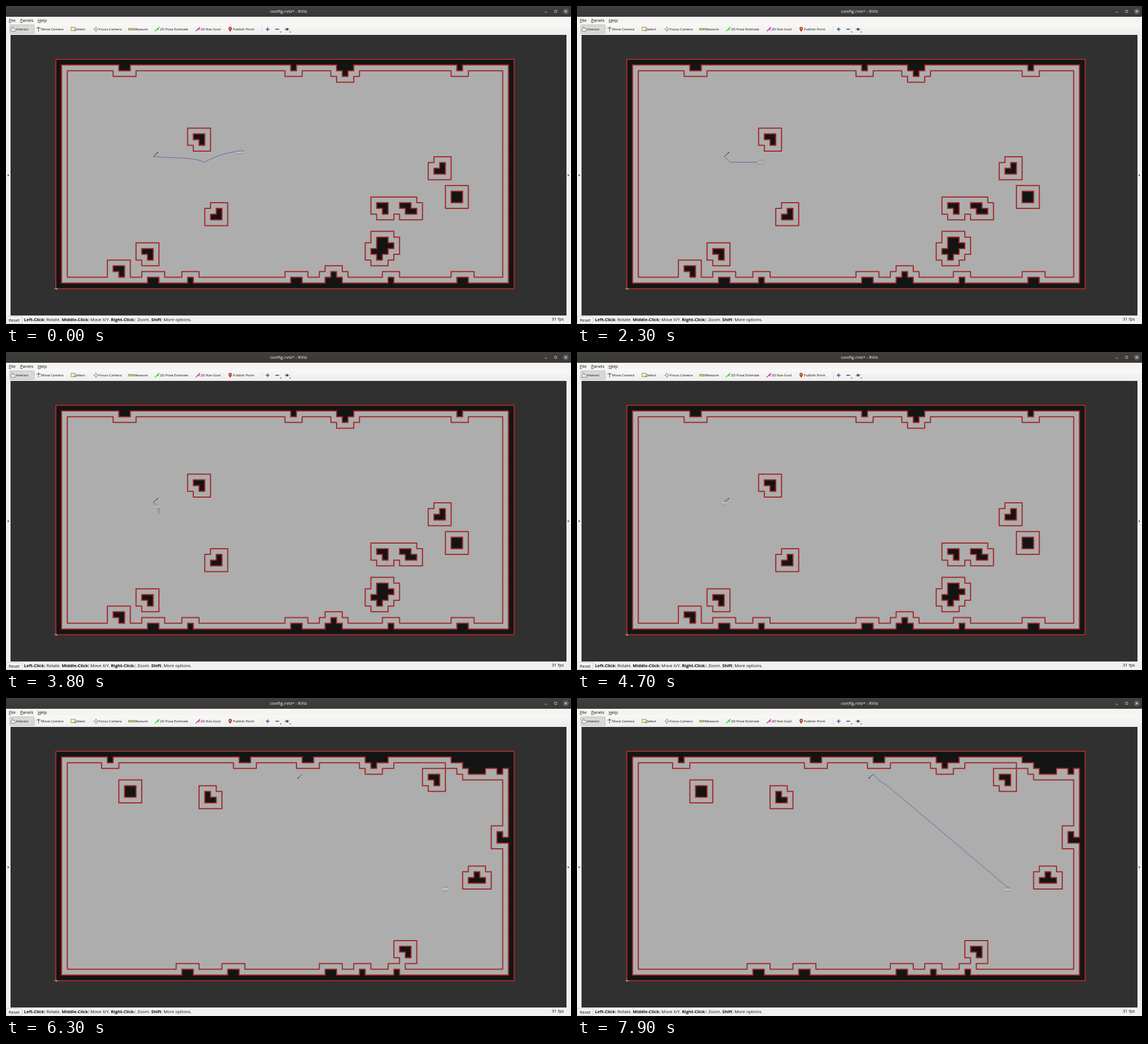
An HTML page for the animation above (8 s loop, 998 by 561 pixels).

```html
<!DOCTYPE html>
<html lang="en">
<head>
<meta charset="utf-8">
<title>Map view</title>
<style>
  html, body { margin: 0; width: 100%; height: 100%; overflow: hidden; background: #303030; }
  svg { display: block; width: 998px; height: 561px; }
  text { font-family: "Open Sans", "Noto Sans", sans-serif; font-size: 7.6px; fill: #0c0c0c; }
  .tool { font-size: 6.15px; }
  .bold { font-weight: 700; }
  .key { text-decoration: underline; }
  .frame { font-size: 2.6px; fill: #f4f4f4; text-anchor: middle; }
</style>
</head>
<body>
<svg viewBox="0 0 998 561">
  <defs>
    <linearGradient id="bar" x2="0" y2="1"><stop stop-color="#403f3d"/><stop offset="1" stop-color="#393836"/></linearGradient>
    <linearGradient id="tools" x2="0" y2="1"><stop stop-color="#f8f8f7"/><stop offset="1" stop-color="#eeedec"/></linearGradient>
  </defs>
  <rect width="998" height="561" fill="#f1f0ef"/>
  <rect width="998" height="19" fill="url(#bar)"/>
  <rect y="19" width="998" height="12" fill="#f5f4f3"/>
  <rect y="31" width="998" height="20" fill="url(#tools)"/>
  <rect x="8" y="51" width="982" height="495" fill="#303030"/>

  <g fill="none" stroke="#d0cec9" stroke-width=".8">
    <path d="M951.5 11h4M969 7.5h3.8v3.8h-3.8z"/>
    <circle cx="988.8" cy="9.4" r="5" fill="#5f5e5b" stroke="none"/>
    <path d="M987 7.6l3.6 3.6m0-3.6l-3.6 3.6" stroke="#fff" stroke-width="1"/>
  </g>

  <g fill="none" stroke="#555" stroke-width=".7">
    <rect x="6.5" y="33" width="43.5" height="15.5" rx="2" fill="#dad8d6" stroke="#b5b2ae"/>
    <path d="M10.5 40v-2.5q0-1 1-1t1 1V40h2.5q1 0 1 1v3.5H9.2V41q0-1 1.3-1z" fill="#fff"/>
    <path d="M57.5 37v8M53.5 39h8M55.8 38.5l1.7-1.7 1.7 1.7" stroke="#666" stroke-width="1"/>
    <rect x="115" y="37.5" width="7" height="6" fill="#fbf3a0" stroke="#777" stroke-width=".8"/>
    <path d="M121 42l2.2 2.2" stroke="#222" stroke-width="1"/>
    <path d="M154.5 41h3m3 0h3M159 36.5v3m0 3v3" stroke="#777" stroke-width="1"/>
    <circle cx="159" cy="41" r="2.6" stroke="#888"/>
    <rect x="216.3" y="39.5" width="8.4" height="2.8" fill="#c8c58a" stroke="#77744c"/>
    <path id="needle" d="M263 44.5l7-6.5M266.3 41.4l3.7-3.4-1.3 4z" stroke="#1fd32f" stroke-width="1.2"/>
    <path d="M335 44.5l7-6.5M338.3 41.4l3.7-3.4-1.3 4z" stroke="#d21fc4" stroke-width="1.2"/>
    <path d="M396 45q-2.6-3.6-2.6-5.3a2.6 2.6 0 0 1 5.2 0q0 1.7-2.6 5.3z" fill="#c33a22" stroke="#9c2a18"/>
    <circle cx="396" cy="39.7" r=".9" fill="#fff" stroke="none"/>
    <path d="M452.5 35v12" stroke="#d4d2cf"/>
    <path d="M458.8 41h6.6m-3.3-3.3v6.6M475.8 41h6.6" stroke="#5076ae" stroke-width="2"/>
    <path d="M492.5 41q4-4 8 0q-4 4-8 0z" fill="#ddd"/>
    <circle cx="496.5" cy="41" r="1.6" fill="#222" stroke="none"/>
    <path d="M483.7 45.3h2.8l-1.4 1.6zM500.700 45.3h2.8l-1.4 1.6zM3 296.5l2.4 2-2.4 2zM992.4 296.5l2.4 2-2.4 2z" fill="#333" stroke="none"/>
    <rect x="1" y="547.8" width="27" height="12" rx="1.5" fill="#f8f7f6" stroke="#bdbab6"/>
  </g>

  <text class="bold" x="499" y="12.3" text-anchor="middle" style="fill:#b9b6b0">config.rviz* - RViz</text>
  <text x="5" y="27.6"><tspan class="key">F</tspan>ile</text>
  <text x="25" y="27.6"><tspan class="key">P</tspan>anels</text>
  <text x="56" y="27.6"><tspan class="key">H</tspan>elp</text>
  <g class="tool-row">
    <text class="tool" x="17.5" y="43">Interact</text>
    <text class="tool" x="62" y="43">Move Camera</text>
    <text class="tool" x="123" y="43">Select</text>
    <text class="tool" x="164" y="43">Focus Camera</text>
    <text class="tool" x="225.5" y="43">Measure</text>
    <text class="tool" x="272" y="43">2D Pose Estimate</text>
    <text class="tool" x="343.5" y="43">2D Nav Goal</text>
    <text class="tool" x="400.8" y="43">Publish Point</text>
  </g>
  <text x="4.7" y="556.6">Reset</text>
  <text x="31.7" y="556"><tspan class="bold">Left-Click:</tspan> Rotate. <tspan class="bold">Middle-Click:</tspan> Move X/Y. <tspan class="bold">Right-Click:</tspan>: Zoom. <tspan class="bold">Shift</tspan>: More options.</text>
  <text x="985.5" y="555" text-anchor="end">31 fps</text>

  <rect x="88" y="94" width="809.6" height="404.8" fill="#adadad"/>
  <path id="cells" fill="#141414"/>
  <path id="edges" fill="none" stroke="#a52a2a" stroke-width="2" stroke-linecap="round"/>
  <path d="M88 498.8h4M88 498.8v-4" stroke="#9a9a7a" stroke-width=".6"/>
  <text class="frame" x="88" y="499.5">map</text>

  <path id="route" fill="none" stroke="#3642a4" stroke-width=".65" stroke-linejoin="round"/>
  <g id="goal" stroke-width=".9">
    <path d="M0 0L7.5-7"/>
    <circle cx="7.3" cy="-6.8" r=".9" fill="#151a22" stroke="none"/>
  </g>
  <g id="robot">
    <rect id="body" x="-5" y="-3.5" width="10" height="7" fill="none" stroke="#858585" stroke-width=".55"/>
    <path d="M-5 0h10" stroke="#cfcfcf" stroke-width=".5"/>
    <text class="frame" y="1.2">base_link</text>
  </g>
</svg>
<script>
const $ = id => document.getElementById(id);
const LOOP = 8000, STEP = 100;
const COLS = 80, ROWS = 40, CELL = 10.12;
const px = i => (88 + i * CELL).toFixed(2);
const py = j => (94 + j * CELL).toFixed(2);

// Obstacles, one string per grid row
const SHAPES = {
  dot: ['#'], bar: ['##'], box: ['##', '##'],
  hook: ['##', '.#'], foot: ['.#', '##'], boot: ['#.', '##'],
  zig: ['##.', '.##'], tee: ['.#.', '###'], tooth: ['###', '.#.'],
  shelf: ['####', '.#..'], blob: ['.##.', '.###', '###.', '.#..'],
  corner: ['##########', '..########', '...###..#.']
};
// Obstacles on the top and bottom walls need only a column
const LAYOUTS = [{
  top: 'bar 11, dot 41, tooth 49, dot 70',
  free: 'hook 24 13, hook 56 25, hook 15 33, hook 10 36, foot 66 18, foot 27 26, box 69 23, zig 60 25, blob 55 31',
  bottom: 'bar 16, dot 23, bar 41, tee 47, dot 58, bar 70'
}, {
  top: 'dot 9, bar 32, bar 43, shelf 54, corner 69',
  free: 'box 12 6, boot 26 7, hook 65 4, boot 77 14, tee 72 21, hook 60 34',
  bottom: 'bar 22, bar 30, bar 47, dot 53, dot 59'
}];

function makeGrid(layout) {
  const grid = Array.from({ length: ROWS }, (_, j) => Array.from({ length: COLS },
    (_, i) => i === 0 || j === 0 || i === COLS - 1 || j === ROWS - 1));
  for (const side in layout) for (const item of layout[side].split(', ')) {
    const [name, x, y] = item.split(' ');
    const shape = SHAPES[name];
    const row0 = side === 'top' ? 1 : side === 'bottom' ? ROWS - 1 - shape.length : +y;
    shape.forEach((row, j) => [...row].forEach((c, i) => {
      if (c === '#') grid[row0 + j][+x + i] = true;
    }));
  }
  return grid;
}

const at = (grid, i, j) => !!(grid[j] && grid[j][i]);

// Grow the occupied area by one cell in all eight directions
const inflate = grid => grid.map((row, j) => row.map((_, i) =>
  [-1, 0, 1].some(dj => [-1, 0, 1].some(di => at(grid, i + di, j + dj)))));

function outline(grid) {
  let d = '';
  for (let j = 0; j <= ROWS; j++) for (let i = 0; i <= COLS; i++) {
    const here = at(grid, i, j);
    if (here !== at(grid, i, j - 1)) d += `M${px(i)} ${py(j)}H${px(i + 1)}`;
    if (here !== at(grid, i - 1, j)) d += `M${px(i)} ${py(j)}V${py(j + 1)}`;
  }
  return d;
}

function fillCells(grid) {
  let d = '';
  grid.forEach((row, j) => row.forEach((on, i) => {
    if (on) d += `M${px(i)} ${py(j)}H${px(i + 1)}V${py(j + 1)}H${px(i)}z`;
  }));
  return d;
}

const maps = LAYOUTS.map(layout => {
  const grid = makeGrid(layout);
  return { cells: fillCells(grid), edges: outline(grid) + outline(inflate(grid)) };
});

let shown = [];
function setMap(cells, edges) {
  if (shown[0] !== cells) $('cells').setAttribute('d', maps[cells].cells);
  if (shown[1] !== edges) $('edges').setAttribute('d', maps[edges].edges);
  shown = [cells, edges];
}

// The robot drives along straight legs at a steady speed
const SPEED = 0.039;
const GOALS = [[260.3, 265.5], [523, 134.5]];
const KINK = [349, 276], BEND = [270, 275.6];
const TRACKS = [[[412, 257.5], KINK, BEND, GOALS[0]], [[776, 337], [740, 338]]];

function follow(track, dist) {
  for (let n = 1; n < track.length; n++) {
    const [x, y] = track[n - 1];
    const dx = track[n][0] - x, dy = track[n][1] - y;
    const length = Math.hypot(dx, dy);
    if (dist < length) {
      const k = dist / length;
      return [x + dx * k, y + dy * k, Math.atan(dy / dx) * 180 / Math.PI];
    }
    dist -= length;
  }
  return [...track[track.length - 1], -43];
}

// Planned route, from the goal back to the robot
function route(t, x, y) {
  const [near, far] = GOALS;
  if (t < 1500) return `M${near}C300 269 333 266 ${KINK}Q${(KINK[0] + x + 9) / 2} ${y - 1} ${x + 9} ${y - 2}`;
  if (t < 3300) return `M${near}L${BEND} ${x + 6} ${BEND[1]}`;
  if (t < 4000) return `M${near}L${BEND}v${CELL}`;
  if (t < 4600) return `M${near}L${x} ${y}`;
  if (t < 6500) return '';
  if (t < 6600) return `M${far}L${near}`;
  return `M${far}l10 10Q540 150 549 155.3L757 331l${x + 4 - 757} ${y - 332}`;
}

function draw(t) {
  setMap(t < 5600 ? 0 : 1, t < 6300 ? 0 : 1);

  const [x, y, angle] = t < 6300
    ? follow(TRACKS[0], SPEED * t)
    : follow(TRACKS[1], SPEED * Math.max(0, t - 7500));
  $('robot').setAttribute('transform', `translate(${x} ${y})`);
  $('body').setAttribute('transform', `rotate(${angle})`);
  $('route').setAttribute('d', route(t, x, y));

  const next = t < 5800 ? 0 : 1;
  $('goal').setAttribute('transform', `translate(${GOALS[next]}) rotate(${next * 180})`);
  $('goal').setAttribute('stroke', next && t < 6500 ? '#323f9c' : '#20242c');
}

const begin = performance.now();
function tick() {
  const t = (performance.now() - begin) % LOOP;
  draw(Math.floor(t / STEP) * STEP);
  requestAnimationFrame(tick);
}
tick();
</script>
</body>
</html>
```
